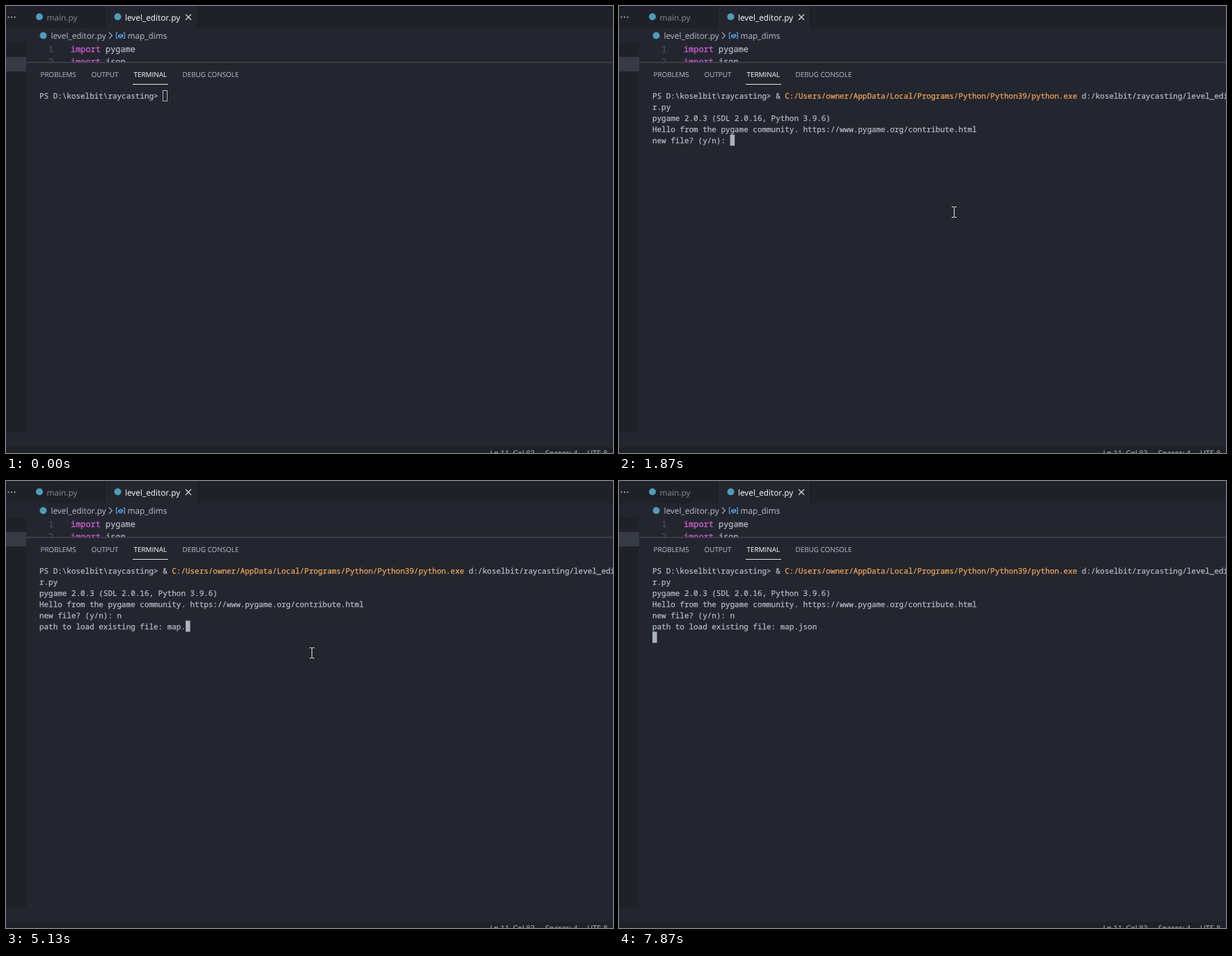
An HTML page that plays this animation: 872x642 px, repeating every 8000 ms.

```html
<!DOCTYPE html>
<html lang="en">
<head>
<meta charset="utf-8">
<title>Terminal session</title>
<style>
  html, body { margin: 0; width: 100%; height: 100%; overflow: hidden; background: #23262e; }
  svg { display: block; }
  text { white-space: pre; text-rendering: geometricPrecision; }
  .ui { font: 11.8px "Open Sans", "Noto Sans", sans-serif; fill: #abb2bf; stroke: #abb2bf; stroke-width: 0.1; }
  .panel { font-size: 9.9px; }
  .status { font-size: 10.8px; }
  .code, .term { fill: #b4bbc8; stroke: #b4bbc8; stroke-width: 0.25; }
  .code { font: 11.92px "Noto Sans Mono", "DejaVu Sans Mono", monospace; }
  .term { font: 10.94px "Noto Sans Mono", "DejaVu Sans Mono", monospace; }
  .white { fill: #eceff4; stroke: #eceff4; }
  .dim { fill: #858b95; stroke: none; }
  .num { fill: #495162; stroke: #495162; text-anchor: end; }
  .key { fill: #d55fde; stroke: #d55fde; }
  .exe { fill: #f0a45d; stroke: #f0a45d; }
  .crisp { shape-rendering: crispEdges; }
</style>
</head>
<body>
<svg width="872" height="642" viewBox="0 0 872 642">
  <defs>
    <clipPath id="editor"><rect x="29" y="52" width="843" height="28.5"/></clipPath>
  </defs>

  <g class="crisp">
    <rect width="872" height="642" fill="#23262e"/>
    <rect width="872" height="32" fill="#1e2128"/>
    <rect x="141" width="134" height="32" fill="#23262e"/>
    <path d="M141.5 0V32M275.5 0V32" stroke="#181b20"/>
    <rect y="52" width="29" height="560" fill="#1e2128"/>
    <rect y="73" width="29" height="21" fill="#353a45"/>
    <rect y="633" width="872" height="9" fill="#1e2128"/>
  </g>
  <rect x="29" y="80.5" width="843" height="1" fill="#50555f"/>
  <rect x="182" y="112" width="51" height="1" fill="#dfe3ea"/>

  <!-- tabs and breadcrumb -->
  <g fill="#b9bec8">
    <circle cx="3.5" cy="16" r="1"/><circle cx="8" cy="16" r="1"/><circle cx="12.5" cy="16" r="1"/>
  </g>
  <g fill="#519aba">
    <circle cx="48" cy="15.5" r="5"/><circle cx="160.5" cy="15.5" r="5"/><circle cx="53.5" cy="42.5" r="5"/>
  </g>
  <g class="ui">
    <text x="58.5" y="20.5" class="dim">main.py</text>
    <text x="171" y="20.5" class="white">level_editor.py</text>
    <text x="64.5" y="46.5">level_editor.py</text>
    <text x="174.5" y="46.5">map_dims</text>
  </g>
  <g fill="none">
    <path d="M258 12l8 8M266 12l-8 8" stroke="#d7dae0" stroke-width="1.2"/>
    <path d="M148 38l4.5 4.5l-4.5 4.5" stroke="#abb2bf" stroke-width="1.1"/>
    <path d="M160.5 38.5h-2v8h2M168.5 38.5h2v8h-2M161.5 42.5l3.5-2l3 1.2v2.3l-3.5 1.8l-3-1.3zM161.5 42.5l3 1.2l3.5-2" stroke="#5fa8ee" stroke-width="1.1"/>
  </g>

  <!-- code -->
  <g class="code" clip-path="url(#editor)">
    <text x="68.5" y="66" class="num">1</text>
    <text x="93" y="66"><tspan class="key">import</tspan> pygame</text>
    <text x="68.5" y="83.5" class="num">2</text>
    <text x="93" y="83.5"><tspan class="key">import</tspan> json</text>
  </g>

  <g class="ui panel">
    <text x="49.5" y="102">PROBLEMS</text>
    <text x="122.5" y="102">OUTPUT</text>
    <text x="183.5" y="102" class="white">TERMINAL</text>
    <text x="253.5" y="102">DEBUG CONSOLE</text>
  </g>

  <g class="ui status">
    <text x="695.5" y="646">Ln 11, Col 83</text>
    <text x="774.5" y="646">Spaces: 4</text>
    <text x="835" y="646">UTF-8</text>
  </g>

  <!-- terminal -->
  <g class="term">
    <text x="48" y="133">PS D:\koselbit\raycasting&gt; <tspan id="command">&amp; <tspan class="exe">C:/Users/owner/AppData/Local/Programs/Python/Python39/python.exe</tspan> d:/koselbit/raycasting/level_edito</tspan></text>
    <text x="48" y="148.9" id="wrapped">r.py</text>
    <g id="banner">
      <text x="48" y="164.8">pygame 2.0.3 (SDL 2.0.16, Python 3.9.6)</text>
      <text x="48" y="180.8">Hello from the pygame community. https://www.pygame.org/contribute.html</text>
    </g>
    <text x="48" y="196.7" id="ask"></text>
    <text x="48" y="212.6" id="path"></text>
  </g>
  <rect id="block" width="6.565" height="15.92" fill="#abb2bf"/>
  <rect id="hollow" x="225.5" y="121.5" width="6" height="15" fill="none" stroke="#abb2bf"/>
  <path id="mouse" class="crisp" fill="none" stroke="#e4e6ea" d="M-3 -7.5H0M1 -7.5H4M-3 7.5H0M1 7.5H4M0.5 -7V7"/>
</svg>

<script>
const LOOP = 8000, TICK = 66.6, CELL = 6.565, ROW = 15.92;
const ASK = 'new file? (y/n): ', PATH = 'path to load existing file: ', FILE = 'map.json';
const keyTimes = [4600, 4670, 4930, 5130, 5470, 5530, 5730, 5800];
const el = id => document.getElementById(id);
const show = (id, on) => el(id).setAttribute('display', on ? 'inline' : 'none');
const mix = (a, b, p) => a + (b - a) * p;

function setCaret(col, row) {
  el('block').setAttribute('x', 48 + col * CELL);
  el('block').setAttribute('y', 121 + row * ROW);
}

function mouseAt(t) {
  const step = start => Math.floor((t - start) / TICK);
  if (t < 1600 || t >= 7870) return null;
  if (t >= 7470) {
    const p = (step(7470) + 1) / 7;
    return [mix(439, 466, p), mix(247, 655, p ** 1.5)];
  }
  const n = Math.min(step(1600), 9);
  if (n <= 4) {
    const p = 1 - (1 - n / 4) ** 1.4;
    return [mix(834, 481, p), mix(96, 296, p)];
  }
  const p = 1 - (1 - (n - 4) / 5) ** 2;
  return [mix(481, 439, p), mix(296, 247, p)];
}

function draw(t) {
  const typed = keyTimes.filter(k => t >= k).length;
  show('command', t >= 1270);
  show('wrapped', t >= 1270);
  show('banner', t >= 1730);
  el('ask').textContent = t < 1730 ? '' : ASK + (t >= 3670 ? 'n' : '');
  el('path').textContent = t < 3730 ? '' : PATH + FILE.slice(0, typed);

  show('hollow', t < 1200);
  show('block', t >= 1200);
  if (t < 1270) setCaret(27, 0);
  else if (t < 1330) setCaret(4, 1);
  else if (t < 1730) setCaret(0, 2);
  else if (t < 3730) setCaret(ASK.length + (t >= 3670), 4);
  else if (t < 6470) setCaret(PATH.length + typed, 5);
  else setCaret(0, 6);

  const pos = mouseAt(t);
  show('mouse', pos);
  if (pos) el('mouse').setAttribute('transform', `translate(${pos.map(Math.round)})`);
}

const start = performance.now();
function frame() {
  draw((performance.now() - start) % LOOP);
  requestAnimationFrame(frame);
}
draw(0);
requestAnimationFrame(frame);
</script>
</body>
</html>
```
